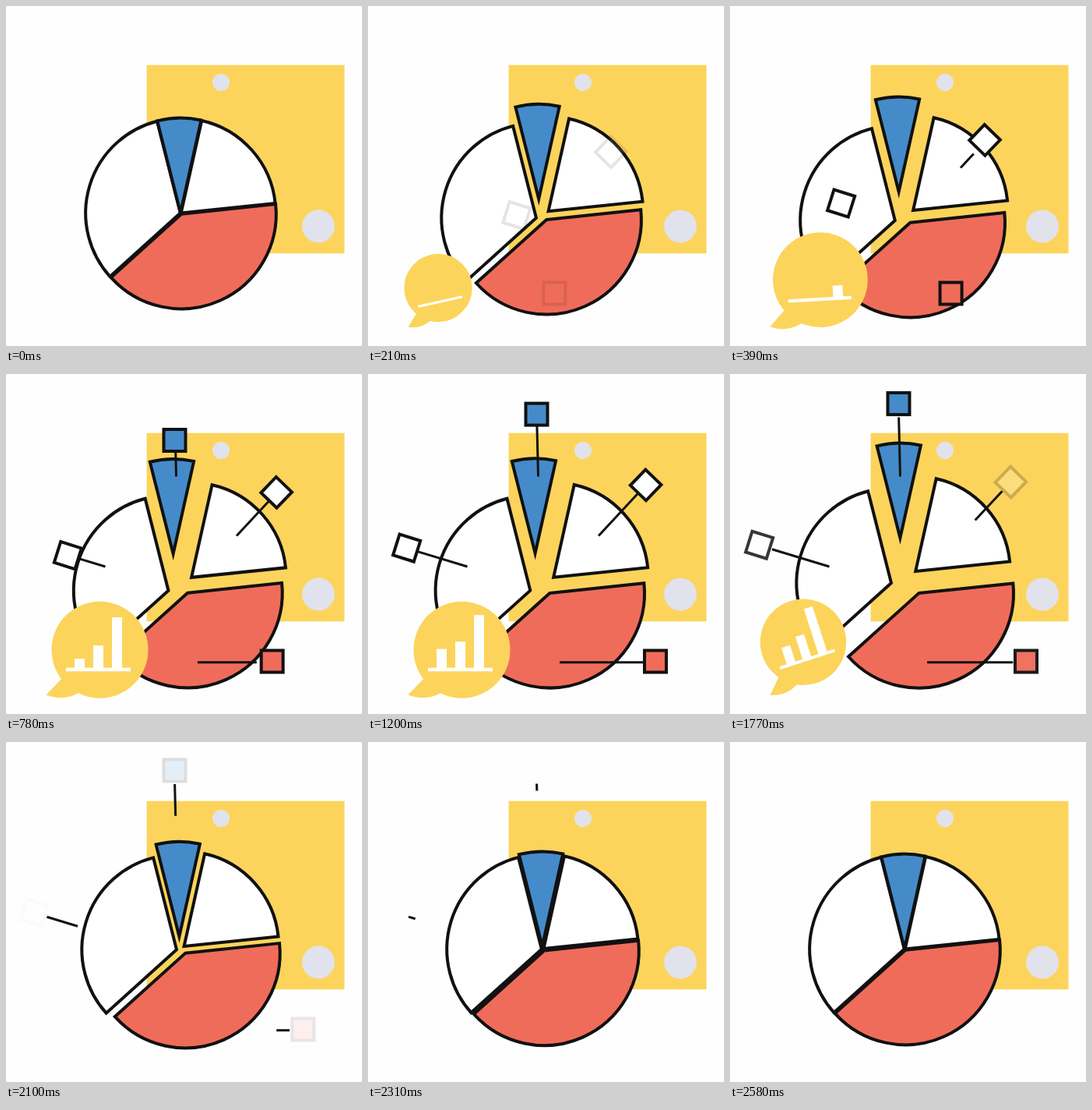
An HTML page that plays this animation: 457x436 px, repeating every 2.73 s.

```html
<!DOCTYPE html>
<html lang="en">
<head>
<meta charset="utf-8">
<title>Pie chart</title>
<style>
  html, body { margin: 0; width: 100%; height: 100%; overflow: hidden; background: #fefefe; }
  svg { display: block; width: 457px; height: 436px; }
</style>
</head>
<body>
<svg viewBox="0 0 457 436">
  <rect x="180.6" y="75.7" width="253.9" height="241.6" fill="#fcd45c"/>
  <circle cx="276" cy="98" r="11" fill="#e2e2ec"/>
  <circle cx="401" cy="282.5" r="21" fill="#e2e2ec"/>
  <g id="behind" stroke="#111"></g>
  <g id="pie" stroke="#111" stroke-width="4" stroke-miterlimit="10"></g>
  <g id="tags" stroke="#111"></g>
  <g id="bubble" fill="#fcd45c">
    <circle cx="120.5" cy="353.7" r="62"/>
    <path d="M51.5 411.5L73 389L100 400L93 409Q74 420 51.5 411.5Z"/>
    <path d="M77 379H160" stroke="#fff" stroke-width="4.4"/>
  </g>
</svg>
<script>
const LOOP = 2730, STEP = 30, LAST = 2580;
const WHITE = '#fff', BLUE = '#458bca', RED = '#f06c5a';
const $ = id => document.getElementById(id);

function set(el, attrs) {
  for (const k in attrs) el.setAttribute(k, attrs[k]);
}
function add(parent, tag, attrs) {
  const el = document.createElementNS('http://www.w3.org/2000/svg', tag);
  set(el, attrs);
  return parent.appendChild(el);
}

// Easing from 0 to 1 over a span of time.
const span = (t, a, b) => Math.min(1, Math.max(0, (t - a) / (b - a)));
const easeOut = (t, a, b, pow = 3) => 1 - (1 - span(t, a, b)) ** pow;
function smooth(t, a, b) {
  const u = span(t, a, b);
  return u * u * (3 - 2 * u);
}
// Exponential approach to 1.
const settle = (t, start, tau) => 1 - Math.exp(-Math.max(0, t - start) / tau);
const mix = (a, b, u) => a + (b - a) * u;

// Wedges burst out, drift further, then gather again.
const R = 121.6;
const wedges = [
  { fill: WHITE, from: 138, to: 255.8, home: [223.8, 265.6], out: [-15.5, 12.2], far: [-16.8, 2.5] },
  { fill: BLUE, from: -104.2, to: -77.4, home: [224, 265.2], out: [-9.5, -35], far: [-5.6, -55] },
  { fill: WHITE, from: -77.4, to: -5.9, home: [224.7, 265.6], out: [13.5, -4.8], far: [13.5, -12.7] },
  { fill: RED, from: -6, to: 138, home: [225.2, 266.7], out: [8, 14.2], far: [17.2, 14.4] }
];
function rim(deg) {
  const a = deg * Math.PI / 180;
  return `${R * Math.cos(a)} ${R * Math.sin(a)}`;
}
for (const w of wedges) {
  w.el = add($('pie'), 'path', {
    d: `M0 0L${rim(w.from)}A${R} ${R} 0 0 1 ${rim(w.to)}Z`, fill: w.fill
  });
}

// Tags: a square slides out to its end; its line draws on, then off.
// show, hide and off are time spans; on is a start and a time constant.
const tags = [
  {
    fill: BLUE, layer: 'behind', turn: 0, end: [216.5, 36], back: [0, 262],
    line: [218.5, 131.5, 216.6, 53],
    show: [390, 430], hide: [1760, 2200], on: [585, 347], off: [1770, 2460]
  },
  {
    fill: WHITE, layer: 'tags', turn: 17.5, end: [35.8, 218.6], back: [233, 75],
    line: [127.5, 247, 51.5, 224],
    show: [180, 330], hide: [1650, 2130], on: [585, 347], off: [1770, 2460]
  },
  {
    fill: WHITE, layer: 'tags', turn: 44, end: [361, 138], back: [-74, 74],
    line: [296, 207.5, 350, 149.5],
    show: [180, 330], hide: [1600, 1840], on: [265, 335], off: [1600, 2030]
  },
  {
    fill: RED, layer: 'tags', turn: 0, end: [381.7, 368.5], back: [-214, 0],
    line: [246, 369.7, 364.5, 369.7],
    show: [180, 330], hide: [1710, 2190], on: [495, 279], off: [1690, 2230]
  }
];
for (const g of tags) {
  g.box = add($(g.layer), 'rect', {
    x: -14, y: -14, width: 28, height: 28, fill: g.fill, 'stroke-width': 4
  });
}
for (const g of tags) g.path = add($('tags'), 'line', { 'stroke-width': 3 });

const bars = [27, 36, 70].map((full, i) => ({
  full, start: 683 - 165 * i,
  el: add($('bubble'), 'rect', { x: 88 + 24 * i, width: 13, fill: WHITE })
}));

function drawPie(t) {
  const drift = smooth(t, 1150, 1770);
  const spread = easeOut(t, 0, 1000) * (1 - easeOut(t, 1770, 2480, 2));
  for (const w of wedges) {
    const [x, y] = w.home.map((h, i) => h + spread * mix(w.out[i], w.far[i], drift));
    set(w.el, { transform: `translate(${x} ${y})` });
  }
}

function drawTags(t) {
  const slide = (1 - t / 3200) ** 6;
  for (const g of tags) {
    const [x, y] = g.end.map((e, i) => e + g.back[i] * slide);
    set(g.box, {
      transform: `translate(${x} ${y}) rotate(${g.turn})`,
      opacity: smooth(t, ...g.show) * (1 - smooth(t, ...g.hide))
    });
    const a = smooth(t, ...g.off), b = settle(t, ...g.on);
    const [x1, y1, x2, y2] = g.line;
    set(g.path, {
      x1: mix(x1, x2, a), y1: mix(y1, y2, a),
      x2: mix(x1, x2, b), y2: mix(y1, y2, b),
      visibility: b > a ? 'visible' : 'hidden'
    });
  }
}

// The bubble swings and scales about the tip of its tail.
function drawBubble(t) {
  const size = easeOut(t, 60, 510) * (1 - smooth(t, 1690, 2080));
  const tilt = -28 * (1 - easeOut(t, 60, 700) + smooth(t, 1460, 1980));
  set($('bubble'), {
    transform: `translate(52 412) rotate(${tilt}) scale(${size}) translate(-52 -412)`,
    visibility: size > 0 ? 'visible' : 'hidden'
  });
  for (const b of bars) {
    const h = b.full * settle(t, b.start, 136);
    set(b.el, { y: 379 - h, height: h });
  }
}

const start = performance.now();
function tick() {
  const now = (performance.now() - start) % LOOP;
  const t = Math.min(LAST, Math.floor(now / STEP) * STEP);
  drawPie(t);
  drawTags(t);
  drawBubble(t);
  requestAnimationFrame(tick);
}
tick();
</script>
</body>
</html>
```
